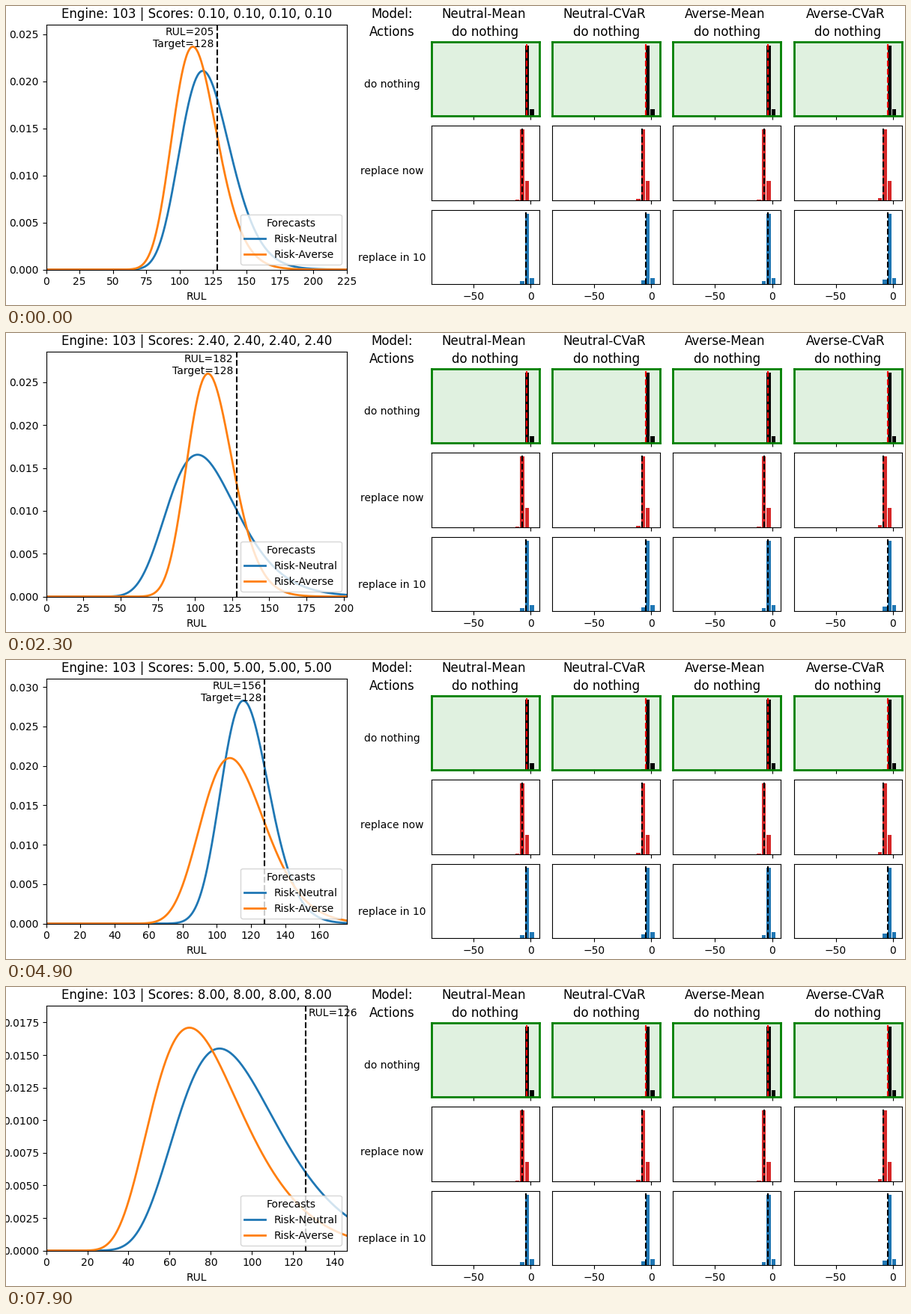
Animation of 1200x400 px, one loop 8 s. Source, as a matplotlib script:

```python
import numpy as np
import matplotlib.pyplot as plt
from matplotlib.animation import FuncAnimation

W, H, DPI = 1200, 400, 100
FRAMES, INTERVAL = 80, 100
START_RUL, CAP = 205, 128

plt.rcParams["font.family"] = "DejaVu Sans"
fig = plt.figure(figsize=(W / DPI, H / DPI), dpi=DPI, facecolor="white")


def add_axes(left, top, right, bottom, **kw):
    """Axes placed by pixel edges, measured from the top left."""
    return fig.add_axes([left / W, 1 - bottom / H,
                         (right - left) / W, (bottom - top) / H], **kw)


def header(x, y, text):
    return fig.text(x / W, 1 - y / H, text, size=12, ha="center")


# Forecast densities: log-normal curves given by mode and peak height
KEYS = [0, 9, 23, 42, 56, 66, 79]
NEUTRAL = dict(mode=[117.3, 112, 101.8, 108.2, 122.8, 89.3, 84.2],
               peak=[.0211, .0183, .01655, .0188, .03775, .0128, .0155])
AVERSE = dict(mode=[109.8, 101.4, 108.8, 102.6, 112.6, 69.4, 69.6],
              peak=[.02367, .01876, .026, .018, .024, .01506, .0171])


def density(x, mode, peak):
    sigma = 0.2
    for _ in range(30):
        sigma = np.exp(-sigma ** 2 / 2) / (np.sqrt(2 * np.pi) * peak * mode)
    return peak * np.exp(-np.log(x / mode) ** 2 / (2 * sigma ** 2))


main = add_axes(53.6, 24.6, 454.7, 352.6)
main.set_xlabel("RUL")
neutral, = main.plot([], [], color="tab:blue", lw=2, label="Risk-Neutral")
averse, = main.plot([], [], color="tab:orange", lw=2, label="Risk-Averse")
target_line = main.axvline(CAP, color="black", ls="--", lw=1.5)
note = main.annotate("", (CAP, 1), xycoords=("data", "axes fraction"),
                     textcoords="offset points", va="top")
main.legend(title="Forecasts", loc="lower right")
title = main.set_title("")

# Action table: row labels
LINE1, LINE2 = 16.2, 39.7
header(515.2, LINE1, "Model:")
header(515.2, LINE2, "Actions")
names = add_axes(470, 48, 559.5, 372)
names.axis("off")
for y, text in [(104.5, "do nothing"), (220.5, "replace now"),
                (336.5, "replace in 10")]:
    names.text(0.505, (372 - y) / 324, text, transform=names.transAxes,
               ha="center", va="center", clip_on=True)

# Action table: cost histograms
MODELS = ["Neutral-Mean", "Neutral-CVaR", "Averse-Mean", "Averse-CVaR"]
BIN, BAR = 4.2, 3.6
ROWS = [
    dict(top=48, color="black", line="red", first=-7.3, right=.095,
         left=[0, .02, 0, .02], marks=[-3.6, -4.6, -3.6, -4.6]),
    dict(top=160.4, color="tab:red", line="black", first=-11.5, right=.275,
         left=[.01, .02, .01, .03], marks=[-7.5, -7.9, -7.2, -8.8]),
    dict(top=273, color="tab:blue", line="black", first=-7.3, right=.09,
         left=[.05, .06, .05, .07], marks=[-3.9, -4.6, -3.6, -4.6]),
]

for col, model in enumerate(MODELS):
    x0 = 567.8 + 161.27 * col
    header(x0 + 69.35, LINE1, model)
    header(x0 + 72, LINE2, "do nothing")
    for i, row in enumerate(ROWS):
        ax = add_axes(x0, row["top"], x0 + 144, row["top"] + 99.4)
        centers = row["first"] + BIN * np.arange(3)
        heights = [row["left"][col], 1, row["right"]]
        ax.bar(centers, heights, width=BAR, color=row["color"])
        ax.axvline(row["marks"][col], color=row["line"], ls="--", lw=1.5)
        ax.set(xlim=(-86.6, 7.6), ylim=(0, 1.05), xticks=[-50, 0], yticks=[])
        if i < 2:
            ax.tick_params(labelbottom=False)
        if i == 0:
            ax.set_facecolor((0.88, 0.945, 0.88))
            for spine in ax.spines.values():
                spine.set(color="green", linewidth=2)


def curve_at(frame, spec):
    return [np.interp(frame, KEYS, spec[k]) for k in ("mode", "peak")]


def update(frame):
    rul = START_RUL - frame
    score = f"{(frame + 1) / 10:.2f}"
    title.set_text("Engine: 103 | Scores: " + ", ".join([score] * 4))

    x = np.linspace(0.01, rul + 20, 400)
    top = 0
    for line, spec in ((neutral, NEUTRAL), (averse, AVERSE)):
        mode, peak = curve_at(frame, spec)
        line.set_data(x, density(x, mode, peak))
        top = max(top, peak)
    main.set_xlim(0, rul + 20)
    main.set_ylim(0, 1.1 * top)

    target = min(rul, CAP)
    target_line.set_xdata([target, target])
    note.xy = (target, 1)
    capped = rul > CAP
    note.set_text(f"RUL={rul}\nTarget={CAP}" if capped else f"RUL={rul}")
    note.set_ha("right" if capped else "left")
    note.set_position((-3 if capped else 3, -2.4))
    return neutral, averse, target_line, note, title


anim = FuncAnimation(fig, update, frames=FRAMES, interval=INTERVAL,
                     init_func=lambda: update(0), repeat=True, repeat_delay=0)
plt.show()
```
